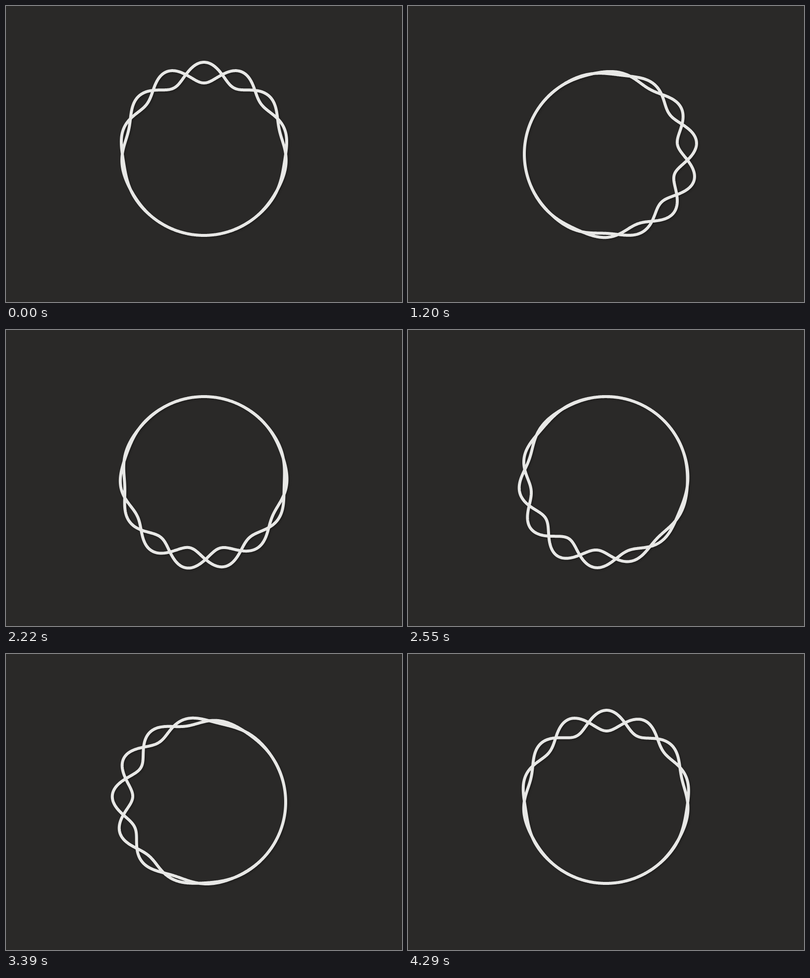
Write an HTML page with a canvas that moves like this. It is 800x600 px and loops after 4320 ms.

```html
<!DOCTYPE html>
<html lang="en">
<head>
<meta charset="utf-8">
<title>Braided ring</title>
<style>
  html, body { margin: 0; width: 100%; height: 100%; overflow: hidden; background: #2a2928; }
  canvas { display: block; }
</style>
</head>
<body>
<canvas id="stage" width="800" height="600"></canvas>
<script>
const ctx = document.getElementById('stage').getContext('2d');
const TAU = Math.PI * 2;
const LOOP = 4320, STEP = 30;
const RADIUS = 165, SWELL = 21, WAVES = 7, FALLOFF = 0.76;
const POINTS = 720;

// Angles run clockwise from the top of the ring.
function addStrand(p, sign) {
  for (let i = 0; i < POINTS; i++) {
    const a = i / POINTS * TAU;
    const turn = i / POINTS - p;
    const d = (turn - Math.round(turn)) * TAU;
    const swell = SWELL * Math.exp(-FALLOFF * d * d);
    const r = RADIUS + sign * swell * Math.cos(WAVES * a + 3 * Math.PI * p);
    const x = 400 + r * Math.sin(a);
    const y = 300 - r * Math.cos(a);
    if (i) ctx.lineTo(x, y);
    else ctx.moveTo(x, y);
  }
  ctx.closePath();
}

function draw(ms) {
  const p = Math.floor((ms % LOOP) / STEP + 0.01) * STEP / LOOP;
  ctx.shadowColor = 'transparent';
  ctx.fillStyle = '#2a2928';
  ctx.fillRect(0, 0, 800, 600);

  ctx.shadowColor = 'rgba(0, 0, 0, 0.3)';
  ctx.shadowBlur = 4;
  ctx.shadowOffsetX = 2;
  ctx.shadowOffsetY = 2;
  ctx.strokeStyle = '#e8e8e6';
  ctx.lineWidth = 6;
  ctx.lineJoin = 'round';
  ctx.beginPath();
  addStrand(p, 1);
  addStrand(p, -1);
  ctx.stroke();
}

let start = null;
function tick(now) {
  if (start === null) start = now;
  draw(Math.max(0, now - start));
  requestAnimationFrame(tick);
}
draw(0);
requestAnimationFrame(tick);
</script>
</body>
</html>
```
